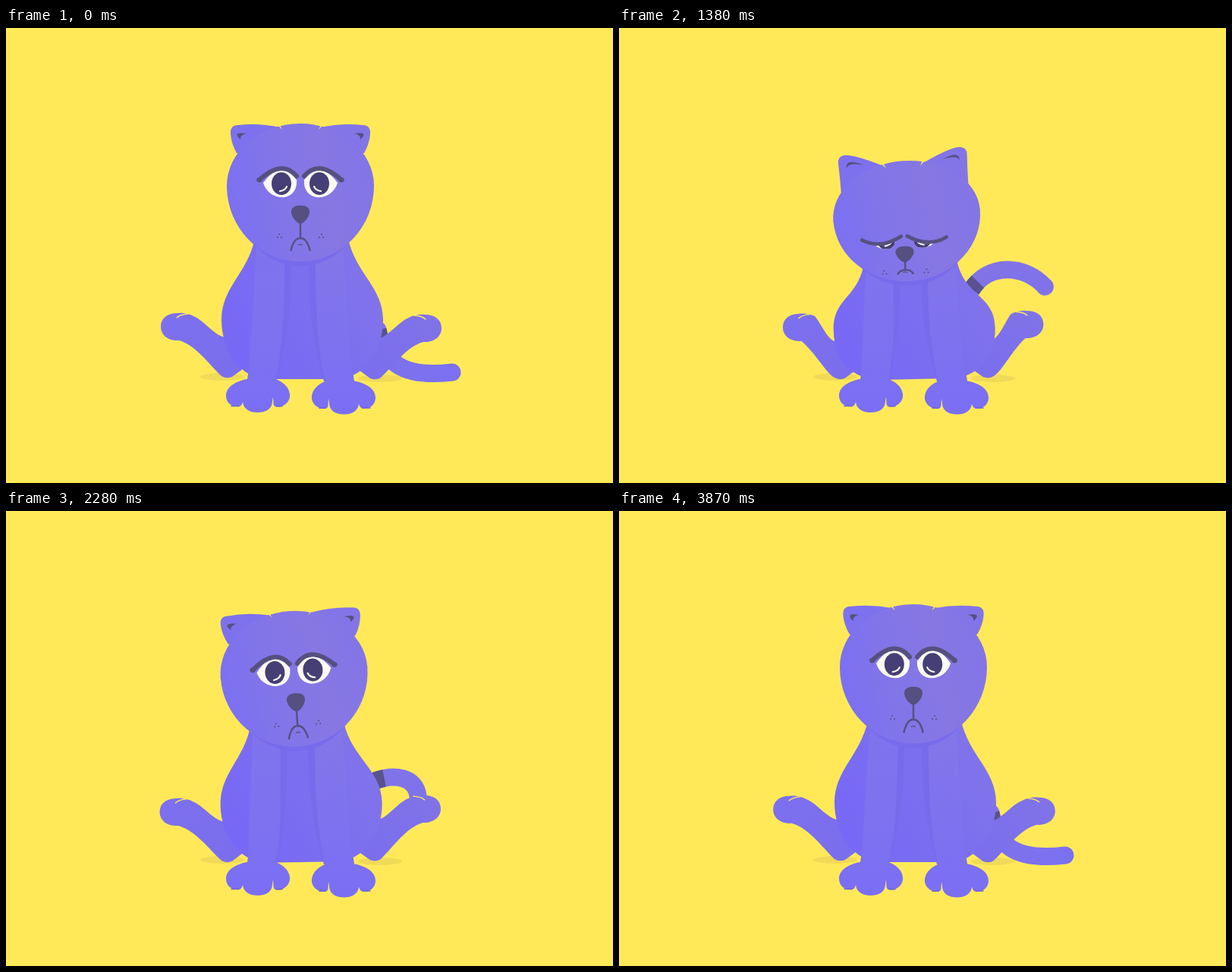
An HTML page with a canvas for the animation above (3900 ms loop, 800 px wide and 600 px high).

```html
<!DOCTYPE html>
<html>
<head>
<meta charset="utf-8">
<style>
  html, body { margin: 0; width: 100%; height: 100%; overflow: hidden; background: #ffe959; }
  canvas { display: block; }
</style>
</head>
<body>
<canvas id="stage" width="800" height="600"></canvas>
<script>
const ctx = document.getElementById('stage').getContext('2d');
const LOOP = 3900;
const YELLOW = '#ffe959', DARK = '#55507f', INK = '#453f76', WHITE = '#fdfbf0';

// Looping monotone curve through [time, value] keys; the first key is at 0.
function track(keys) {
  const n = keys.length;
  const key = i => {
    const [t, v] = keys[(i + n) % n];
    return [t + LOOP * Math.floor(i / n), v];
  };
  const slope = i => {
    const [t0, v0] = key(i), [t1, v1] = key(i + 1);
    return (v1 - v0) / (t1 - t0);
  };
  const tangent = i => {
    const a = slope(i - 1), b = slope(i);
    return a * b > 0 ? 2 * a * b / (a + b) : 0;
  };
  return t => {
    let i = n - 1;
    while (keys[i][0] > t) i--;
    const [t0, v0] = key(i), [t1, v1] = key(i + 1);
    const d = t1 - t0, u = (t - t0) / d, w = 1 - u;
    return v0 * (1 + 2 * u) * w * w + v1 * u * u * (3 - 2 * u) +
      d * u * w * (tangent(i) * w - tangent(i + 1) * u);
  };
}

// Poses: 0 upright, 1 half raised, 2 slumped, 3 nodding off.
const posture = track([[0, 1], [420, 2], [690, 2.1], [960, 2.1], [1080, 2.13], [1800, 3], [1860, 3],
  [2010, 2.6], [2280, 1.21], [2550, .33], [2760, 0], [3050, -.1], [3480, -.1], [3660, .13], [3870, .8]]);
const mood = track([[0, 1], [420, 2], [1000, 2], [1800, 3], [1860, 3], [2010, 2.5], [2280, .95],
  [2550, .3], [2760, 0], [3050, -.1], [3480, -.1], [3660, .13], [3870, .8]]);
const sway = track([[0, 0], [960, 0], [1080, -1], [1800, -18.5], [1930, -18.5], [2280, -8.5], [2760, -1], [3150, 0]]);

// Tail bezier: base, two handles, tip.
const tailKeys = [
  [0, [490, 398, 498, 440, 520, 462, 588, 454]],
  [420, [468, 341, 490, 314, 552, 318, 553, 364]],
  [690, [464, 340, 488, 308, 540, 308, 563, 348]],
  [1080, [464, 340, 488, 308, 540, 308, 563, 348]],
  [1800, [468, 354, 484, 318, 525, 322, 556, 330]],
  [2280, [486, 356, 512, 346, 540, 350, 543, 376]],
  [2760, [490, 392, 498, 428, 520, 430, 548, 426]],
  [3150, [490, 398, 498, 440, 520, 462, 588, 454]]
];
const tail = tailKeys[0][1].map((_, i) => track(tailKeys.map(([t, v]) => [t, v[i]])));

function blend(pose, values) {
  const i = Math.max(0, Math.min(2, Math.floor(pose)));
  return values[i] + (values[i + 1] - values[i]) * (pose - i);
}

function fill(d, color) {
  ctx.fillStyle = color;
  ctx.fill(new Path2D(d));
}

function line(d, color, width, cap = 'round') {
  ctx.strokeStyle = color;
  ctx.lineWidth = width;
  ctx.lineCap = cap;
  ctx.stroke(new Path2D(d));
}

function oval(x, y, rx, ry, color, from = 0, to = 7) {
  ctx.fillStyle = color;
  ctx.beginPath();
  ctx.ellipse(x, y, rx, ry, 0, from, to);
  ctx.fill();
}

function gradient(x0, y0, x1, y1, ...colors) {
  const g = ctx.createLinearGradient(x0, y0, x1, y1);
  colors.forEach((c, i) => g.addColorStop(i / (colors.length - 1), c));
  return g;
}

function group(draw) {
  ctx.save();
  draw();
  ctx.restore();
}

// Draws a left part and its mirror image.
function pair(draw, axis = 0, dy = 0) {
  group(() => draw(false));
  group(() => {
    ctx.translate(axis, dy);
    ctx.scale(-1, 1);
    draw(true);
  });
}

function drawTail(t) {
  const [x, y, ...rest] = tail.map(f => f(t).toFixed(2));
  const d = `M${x} ${y} C${rest.join(' ')}`;
  line(d, gradient(480, 320, 590, 460, '#8274e6', '#7b70f0'), 23);
  ctx.setLineDash([13, 999]);
  line(d, '#59528e', 23, 'butt');
  ctx.setLineDash([]);
}

function drawLeg(m, right) {
  const fx = blend(m, [-4, 0, 10, 17]), fy = blend(m, [-1, 0, -4, 0]);
  const P = (x, y, w = 1) => `${x + w * fx} ${y + w * fy + 3.2 * w * (1 - w) * fx} `;
  fill(`M${P(204, 394)}C${P(204, 383)}${P(212, 376)}${P(226, 376)}
    C${P(232, 375)}${P(242, 377)}${P(247, 380)}C${P(262, 386, .7)}${P(274, 406, .3)}${P(290, 408, .1)}
    L320 440 313 449 298 460 Q290 463 284 459
    C${P(268, 444, .4)}${P(250, 418, .7)}${P(228, 412)}C${P(214, 413)}${P(204, 405)}${P(204, 394)}Z`,
    gradient(210, 380, 300, 455, right ? '#8073e6' : '#7c70ee', '#7a6eee'));
  line(`M${P(225, 382)}Q${P(230, 377.5)}${P(240, 377)}`, YELLOW, 1.3);
}

function drawBody(p, dx) {
  const neck = blend(p, [276, 284, 300, 332]), wide = blend(p, [382, 385, 392, 402]);
  const nx = dx * .25;
  fill(`M${328 + nx} ${neck - 6} C${318 + nx} ${neck + 40} 284 ${wide - 43} 284 ${wide}
    C284 ${wide + 41} 310 463 345 463 L436 463 C471 463 497 ${wide + 41} 497 ${wide}
    C497 ${wide - 43} ${461 + nx} ${neck + 40} ${451 + nx} ${neck - 6} Z`,
    gradient(290, 430, 490, 320, '#7768f7', '#7b6ef0', '#8174e9'));
}

function drawArm(p, shift, right) {
  const top = blend(p, [276, 284, 300, 332]), chin = blend(p, [298, 306, 318, 342]);
  const inner = 367 + shift;
  fill(`M${inner - 4} ${chin} L${inner + 9} ${chin} C${inner + 9} 385 366 430 356 466 L345 466Z`, '#776bec');
  fill(`M${331 + shift} ${top} L319 466 355 466 C364 420 ${inner} 380 ${inner} ${chin}Z`,
    gradient(0, 300, 0, 466, right ? '#8376e9' : '#8074ed', '#7c70f2'));
}

function drawPaw() {
  fill(`M318 463 C301 466 290 474 290 485 C290 494 298 500 304 499 C309 500 311 497 312 493
    C313 503 322 507 331 507 C344 507 351 501 351 492 L352 486 352.5 495 C353 499 355 500 360 499.5
    C369 498 375 491 374 483 C373 473 364 466 355 463 L355 450 320 450Z`,
    gradient(0, 455, 0, 505, '#7c70f2', '#7a6ef5'));
  line('M297 498.5 H307 M356 498.8 H364', '#6c62df', 1.5);
}

function drawEar(m, right) {
  const b = (...v) => blend(m, v);
  const sx = b(-95, -92, -85, -85), sy = b(-70, -68, -78, -68);
  const tx = b(-84, -82, -74, -75), ty = b(-80, -80, -90, -79);
  const ex = b(-29, -27, -25, -26), ey = b(-80, -77, -71, -62);
  const by = b(-43, -43, -41, -30);
  fill(`M-84 ${by} Q${sx + 1} ${(sy + by) / 2} ${sx} ${sy} Q${sx - 1} ${ty} ${tx} ${ty}
    Q${b(-56, -55, -60, -60)} ${b(-83, -83, -89, -78)} ${ex} ${ey} L-30 -30Z`, right ? '#8375e7' : '#7d71ee');
  const lowX = b(-81, -79, -75, -75), lowY = b(-60, -61, -72, -62);
  fill(`M${lowX} ${lowY} Q${b(-92, -91, -75, -75)} ${b(-72, -72, -86, -76)}
    ${b(-73, -71, -53, -52)} ${b(-69, -69, -75, -65)}
    Q${b(-82, -80, -72, -72)} ${b(-67, -67, -80, -70)} ${lowX} ${lowY}Z`, DARK);
  return [ex, ey];
}

function drawEye(m) {
  const b = (...v) => blend(m, v);
  const mid = b(-67, -61, -13, -17);
  const ox = b(-49, -49, -43, -37), oy = b(-46, -42, -12, -18);
  const ix = b(-5, -5, -11, -15), iy = b(-46, -46, -15, -20);
  const avg = (oy + iy) / 2;
  const low = (b(-25.5, -23, -4, -12) - avg / 4) / .75;
  const white = `M${ox} ${oy} Q${b(-27, -26, -30, -29)} ${2 * (mid + 2) - avg} ${ix} ${iy}
    C${ix + 2} ${low} ${ox + 8} ${low} ${ox} ${oy}Z`;
  fill(white, WHITE);
  group(() => {
    ctx.clip(new Path2D(white));
    const px = b(-26, -25, -23, -24), py = b(-44, -41, -18, -26);
    oval(px, py, 13, 15, INK);
    line(`M${px - 2} ${py + 10} Q${px + 5} ${py + 9} ${px + 7} ${py + 4}`, WHITE, 2.2);
  });
  const bx = b(-55, -54, -56, -55), by = b(-50, -46, -19, -22.5);
  const nx = b(-5, -5, -3, -5), ny = b(-53, -51, -22, -26);
  line(`M${bx} ${by} Q${b(-25, -24, -32, -32)} ${2 * mid - (by + ny) / 2} ${nx} ${ny}`, DARK, b(6, 6, 5.2, 4.2));
  oval(bx, by, b(4, 3.7, 2.6, 2), b(3.5, 3.3, 2.6, 2), DARK);
}

function drawFace(m) {
  const b = (...v) => blend(m, v);
  const h = b(12.5, 12, 11, 10);
  const lip = b(32.5, 31, 25, 15.5), drop = b(19, 16, 6, 4), w = b(12.5, 12.5, 10, 10);
  const dots = b(30, 28, 29, 16);
  pair(() => {
    drawEye(m);
    oval(-25, dots + 2, 1, 1, DARK);
    oval(-28, dots - 2, 1, 1, DARK);
    oval(-30, dots + 2, 1, 1, DARK);
  });
  line(`M0 ${h - 3} V${lip}`, DARK, 2.4);
  line(`M${-w} ${lip + drop} C${-w * .8} ${lip + drop * .35} ${-w * .45} ${lip} 0 ${lip}
    C${w * .45} ${lip} ${w * .8} ${lip + drop * .35} ${w} ${lip + drop}`, DARK, 2.4);
  const crease = lip + drop * .5 + 1;
  line(`M-2.5 ${crease} Q0 ${crease - 1.5} 2.5 ${crease}`, DARK, 1.3);
  fill(`M0 ${-h} C8 ${-h} 12 ${-h * .75} 12 ${-h * .3} C12 ${h * .3} 4 ${h} 0 ${h}
    C-4 ${h} -12 ${h * .3} -12 ${-h * .3} C-12 ${-h * .75} -8 ${-h} 0 ${-h}Z`, DARK);
}

function drawHead(p, m, dx) {
  const up = blend(p, [86, 82, 77, 67]), down = blend(p, [104, 100, 90, 84]);
  ctx.translate(388 + dx, blend(p, [197, 208, 231, 263]));
  ctx.rotate(dx * .008);
  oval(0, 0, 90, down + 6, '#776bec', 0, Math.PI);
  let notch;
  pair(right => { notch = drawEar(m, right); });
  const skin = gradient(-97, 20, 97, -20, '#7b70f2', '#8275e9', '#8677e2', '#8375e8');
  oval(0, 0, 97, up, skin, Math.PI - .01, 2 * Math.PI + .01);
  oval(0, 0, 97, down, skin, -.01, Math.PI + .01);
  const [ex, ey] = notch;
  pair(() => fill(`M${ex - 4} ${ey - 4} L${ex + 3} ${ey + 3} ${ex} ${ey - 3}Z`, YELLOW));
  ctx.translate(blend(m, [0, 0, -1, -12]), blend(p, [37.5, 38, 46, 56]));
  ctx.rotate(blend(m, [0, 0, 0, .075]));
  drawFace(m);
}

function draw(t) {
  const p = posture(t), m = mood(t), dx = sway(t);
  ctx.fillStyle = YELLOW;
  ctx.fillRect(0, 0, 800, 600);
  oval(285, 460, 29, 5, '#f0da58');
  oval(493, 462, 29, 5, '#f0da58');
  drawTail(t);
  group(() => {
    ctx.translate(390, 460);
    ctx.rotate(dx * .0022);
    ctx.translate(-390, -460);
    pair(right => drawLeg(m, right), 778, 2);
    drawBody(p, dx);
  });
  pair(right => drawArm(p, dx * (right ? -.1 : .65), right), 775);
  pair(drawPaw, 777, 2.5);
  group(() => drawHead(p, m, dx));
}

function frame() {
  draw(performance.now() % LOOP);
  requestAnimationFrame(frame);
}
frame();
</script>
</body>
</html>
```
